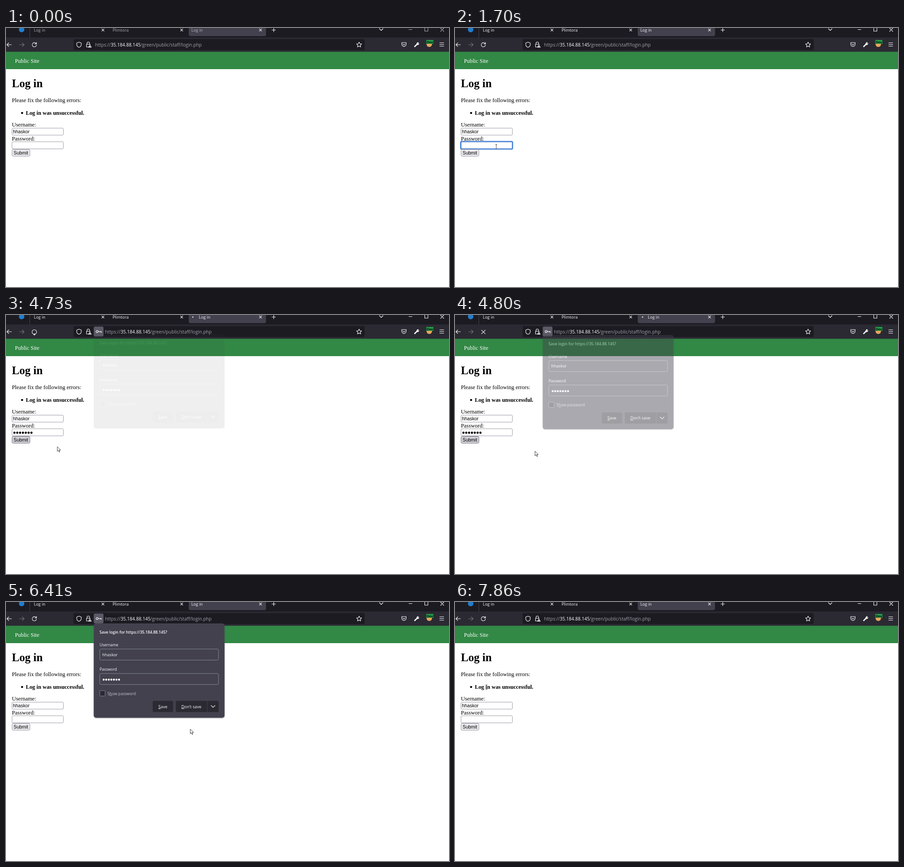
Write an HTML page that moves like this. It is 977 px wide and 573 px high and loops after 7990 ms.

```html
<!DOCTYPE html>
<html lang="en">
<head>
<meta charset="utf-8">
<title>Log in</title>
<style>
  html, body { margin: 0; width: 100%; height: 100%; overflow: hidden; background: #fff; }
  svg { display: block; }
  text { white-space: pre; }
  .ui { font: 9px "Open Sans", sans-serif; fill: #fbfbfe; }
  .url { font-size: 10.1px; fill: #a2a2ac; }
  .page { font: 12.35px "Liberation Serif", serif; }
  .form { font: 10.3px "Liberation Sans", sans-serif; }
  .icon { fill: none; stroke: #fbfbfe; stroke-width: 1.1; stroke-linecap: round; stroke-linejoin: round; }
  .field { fill: #fff; stroke: #8f8f9d; stroke-width: .9; }
  .box { fill: #42414d; stroke: #8f8f9d; stroke-width: .9; }
  .button { fill: #2b2a33; }
  .key { text-decoration: underline; }
</style>
</head>
<body>
<svg width="977" height="573" viewBox="0 0 977 573">
  <defs>
    <clipPath id="tabShape"><path d="M403 0h170.500v14a4 4 0 0 1-4 4h-162.500a4 4 0 0 1-4-4z"/></clipPath>
    <radialGradient id="glow">
      <stop offset=".35" stop-color="#0a84ff"/>
      <stop offset="1" stop-color="#0a84ff" stop-opacity="0"/>
    </radialGradient>
  </defs>

  <!-- page -->
  <rect y="52" width="977" height="39" fill="#328845"/>
  <g class="page">
    <text x="19.700" y="77" fill="#fff">Public Site</text>
    <text x="13" y="130.500" font-size="24.700" font-weight="bold">Log in</text>
    <text x="13" y="164">Please fix the following errors:</text>
    <circle cx="35.500" cy="188" r="2.300"/>
    <text x="43.700" y="191.500" font-weight="bold">Log in was unsuccessful.</text>
    <text x="13" y="218">Username:</text>
    <text x="13" y="249">Password:</text>
  </g>
  <g class="form">
    <rect class="field" x="13.300" y="221.500" width="113.200" height="15.500" rx="2"/>
    <text x="15.300" y="233.300">hhaskor</text>
    <rect id="password" class="field" x="13.300" y="251.700" width="113.200" height="15.700" rx="2"/>
    <g id="focus" fill="none">
      <rect x="11.500" y="250" width="116.500" height="19" rx="3" stroke="#a9c8f4" stroke-width="1.500"/>
      <rect x="13" y="251.500" width="113.500" height="16" rx="1.500" stroke="#0a58c8" stroke-width="1.600"/>
    </g>
    <g id="dots"></g>
    <path id="caret" d="M0 253.500v12.500" stroke="#000" stroke-width=".9"/>
    <rect id="submit" x="13.300" y="268.500" width="39.500" height="15.200" rx="3" stroke="#8f8f9d" stroke-width=".9"/>
    <text x="16.800" y="280">Submit</text>
  </g>

  <!-- tab strip -->
  <rect width="977" height="21" fill="#1c1b22"/>
  <rect y="21" width="977" height="31.500" fill="#2b2a33"/>
  <path d="M52.500 0v21" stroke="#45444f"/>
  <circle cx="34.500" cy="3.500" r="6" fill="#1f7fd0"/>
  <g clip-path="url(#tabShape)">
    <rect x="403" width="171" height="18" fill="#42414d"/>
    <circle id="burst" cx="412" cy="5" fill="url(#glow)"/>
  </g>
  <circle id="spinner" cy="4.500" r="1.500" fill="#d5d5dc"/>
  <g class="ui" id="labels">
    <text x="61.500" y="8">Log in</text>
    <text x="235" y="8">Plimtora</text>
    <text id="tabLabel" y="8">Log in</text>
    <g class="icon" stroke-width="1">
      <path d="M888.500 3.500h7M923.500-1h7v8h-7zM958.500.500l7 7m0-7l-7 7"/>
    </g>
  </g>
  <g class="icon">
    <path d="M211.300 1.800l5 5m0-5l-5 5M385 1.800l5 5m0-5l-5 5M558.800 1.800l5 5m0-5l-5 5"/>
    <path d="M586.500 4.500h8m-4-4v8M823.500 1.500l4 4 4-4"/>
  </g>

  <!-- toolbar -->
  <rect x="149" y="24.500" width="642" height="24.500" rx="3.500" fill="#1c1b22"/>
  <g class="icon">
    <path d="M12 37H2m4.200-4.200L2 37l4.200 4.200"/>
    <path d="M30 37h10m-4.200-4.200L40 37l-4.200 4.200" stroke="#777681"/>
    <g id="reload"><path d="M66.300 34.300A4.700 4.700 0 1 0 67.200 37.500M67.300 31.800v3.400h-3.500"/></g>
    <g id="ring"><circle cx="62.500" cy="37.500" r="5"/><path d="M61 43.500l2.500-2v3z" fill="#fbfbfe"/></g>
    <path id="stop" d="M58.500 33.300l8.300 8.300m0-8.300l-8.300 8.300"/>
    <path d="M161 31.200l5 2v3.300c0 3-2 5.200-5 6.200-3-1-5-3.200-5-6.200v-3.300z"/>
    <path d="M178.700 36v-2.200a2.800 2.800 0 0 1 5.600 0V36M184 42h-6.500v-6h8v1"/>
    <path d="M185.200 37.500l3.300 5.300h-6.600z" fill="#fbfbfe" stroke-width=".6"/>
    <path d="M185.200 39.300v2.200" stroke="#1c1b22" stroke-width=".8"/>
    <path d="M778.700 31.200l1.700 3.600 3.900.5-2.900 2.700.8 3.900-3.500-1.900-3.500 1.900.8-3.900-2.900-2.700 3.900-.5z"/>
    <path d="M872.800 32.300h9.700v3.700a4.850 4.850 0 0 1-9.700 0zM875 35.300l2.600 2.400 2.600-2.400"/>
    <path d="M901.500 41l4.800-4.800" stroke-width="2.600"/>
    <path d="M909.600 32.200l-2 2 .3 1.200 1.200.3 1.500-1.700a3 3 0 0 1-4 3 3 3 0 0 1 3-4.800z" fill="#fbfbfe"/>
    <path d="M956.500 32.800h9m-9 3.700h9m-9 3.700h9"/>
  </g>
  <circle cx="933.500" cy="36" r="6" fill="#e8a55c"/>
  <rect x="927" y="26.500" width="15.500" height="8.500" fill="#22a04a"/>
  <text x="928" y="33.800" font-family="Liberation Sans, sans-serif" font-size="7.500" font-weight="bold">Dev</text>
  <g id="keyIcon">
    <rect id="keyBack" x="193.500" y="25.500" width="21.500" height="22" rx="3" fill="#5b5a66"/>
    <g class="icon"><circle cx="201" cy="36.500" r="2.300"/><path d="M203.300 36.500h7v2.300m-2.500-2.300v1.700"/></g>
  </g>
  <g id="address" class="ui">
    <text class="url" x="196.500" y="41.300">https://<tspan x="231" fill="#fbfbfe">35.184.88.145</tspan><tspan x="296.500">/green/public/staff/login.php</tspan></text>
  </g>

  <!-- save-login panel -->
  <g id="panel" class="ui">
    <rect x="192.500" y="49" width="291" height="210" rx="6" fill="#000" opacity=".08"/>
    <rect x="193.800" y="48" width="288" height="208" rx="5" fill="#42414d" stroke="#52525e" stroke-width=".8"/>
    <text x="206.300" y="70.300" font-size="8.700" font-weight="600" style="font-size:8.600px">Save login for https://35.184.88.145?</text>
    <text x="206.500" y="98" style="font-size:8.500px">Username</text>
    <rect class="box" x="206.800" y="104" width="262" height="24.500" rx="3"/>
    <text x="212.300" y="119.700">hhaskor</text>
    <text x="206.500" y="152.300" style="font-size:8.500px">Password</text>
    <rect class="box" x="206.800" y="158.200" width="262" height="24.300" rx="3"/>
    <g id="panelDots"></g>
    <rect class="box" x="206.800" y="196" width="11.700" height="12" rx="1.500" style="fill:#2b2a33"/>
    <text x="223.700" y="205.500" fill="#c3c3cc" style="font-size:8.600px">S<tspan class="key">h</tspan>ow password</text>
    <rect class="button" x="323.500" y="218.700" width="45" height="24.800" rx="3"/>
    <text x="336" y="234.500" style="font-size:9.200px"><tspan class="key">S</tspan>ave</text>
    <path id="dontSave" d="M443.500 218.700v24.800h-66a3 3 0 0 1-3-3v-18.800a3 3 0 0 1 3-3z"/>
    <text x="386.700" y="234.500" style="font-size:9.200px"><tspan class="key">D</tspan>on’t save</text>
    <path class="button" d="M444.500 218.700h21.500a3 3 0 0 1 3 3v18.800a3 3 0 0 1-3 3h-21.500z"/>
    <path class="icon" d="M452.500 229l4.200 4.200 4.200-4.200"/>
  </g>

  <g id="pointer">
    <circle id="click" r="9.300" fill="#d8c722" opacity=".82"/>
    <path id="arrow" d="M0 0v10.200l2.400-2.200 1.700 3.900 1.600-.7-1.700-3.800h3.300z" fill="#fff" stroke="#111" stroke-width=".8"/>
    <path id="beam" d="M-2-5h1.500l.5.5.5-.5H2M0-4.500v9M-2 5h1.500l.5-.5.5.5H2" fill="none" stroke="#333" stroke-width=".9"/>
  </g>
</svg>
<script>
const LOOP = 7990;
const KEYSTROKES = [2430, 2690, 2960, 3150, 3440, 3640, 3840];
// pointer stops: time, x, y
const STOPS = [
  [150, 705, 506], [850, 91, 262.5], [3840, 91, 262.5], [4370, 33, 278], [4560, 33, 279],
  [5130, 408, 337], [5390, 410, 326.5], [6000, 410, 326], [6810, 403, 238], [7200, 403, 234],
  [7480, 403, 234], [7740, 132, 190], [7860, 69.5, 188.5]
];

const $ = id => document.getElementById(id);
const clamp = v => Math.max(0, Math.min(1, v));
const set = (id, attrs) => { for (const k in attrs) $(id).setAttribute(k, attrs[k]); };
const show = (id, on) => { $(id).style.display = on ? '' : 'none'; };

function addDots(id, x, y, step, r, fill) {
  $(id).innerHTML = KEYSTROKES.map((_, i) =>
    `<circle cx="${x + i * step}" cy="${y}" r="${r}" fill="${fill}"/>`).join('');
}
addDots('dots', 18.6, 260.5, 6.25, 2.4, '#000');
addDots('panelDots', 215.4, 171.7, 5.65, 2.2, '#fbfbfe');

function pointerAt(t) {
  const next = STOPS.findIndex(s => s[0] > t);
  if (next < 1) return STOPS[next ? STOPS.length - 1 : 0].slice(1);
  const [t0, x0, y0] = STOPS[next - 1], [t1, x1, y1] = STOPS[next];
  const u = (t - t0) / (t1 - t0), e = u * u * (3 - 2 * u);
  return [x0 + (x1 - x0) * e, y0 + (y1 - y0) * e];
}

function render(t) {
  const within = (a, b) => t >= a && t < b;
  const [x, y] = pointerAt(t);
  const inside = (l, top, r, b) => x > l && x < r && y > top && y < b;

  // pointer
  const overField = inside(13, 251, 127, 268);
  const beam = overField || inside(13, 180, 175, 197);
  show('pointer', t >= 180);
  set('pointer', { transform: `translate(${x} ${y})` });
  show('beam', beam);
  show('arrow', !beam);
  show('click', within(1110, 1440) || within(4370, 4580) || within(7270, 7480));

  // form
  const typed = KEYSTROKES.filter(k => k <= t).length;
  const focused = within(1250, 4580);
  set('labels', { opacity: t < 1250 ? .65 : 1 });
  $('password').style.stroke = overField ? '#676774' : '';
  show('focus', focused);
  [...$('dots').children].forEach((dot, i) => { dot.style.display = i < typed && t < 5390 ? '' : 'none'; });
  show('caret', focused && !within(1700, 2230) && !within(3290, 3440));
  set('caret', { transform: `translate(${16.3 + typed * 6.2} 0)` });
  const pressed = t < 5390 && (inside(13, 268, 53, 284) || within(4370, 5390));
  set('submit', { fill: pressed ? '#d0d0d7' : '#e9e9ed', stroke: pressed ? '#676774' : '#8f8f9d' });

  // tab and reload button
  const burst = clamp((t - 5390) / 490);
  show('burst', within(5390, 5880));
  set('burst', { r: 8 + 170 * burst, opacity: .6 * (1 - burst) });
  show('spinner', within(4660, 5390));
  set('spinner', { cx: 412 + 4 * Math.sin((t - 4730) / 160) });
  set('tabLabel', { x: within(4660, 5850) ? 425.3 : 408.7 });
  show('reload', !within(4660, 6070));
  show('ring', within(4660, 4800));
  show('stop', within(4800, 6070));
  $('stop').style.stroke = t < 5390 ? '' : '#8f8f9d';

  // address bar and panel
  const hasKey = within(2430, 7500);
  show('keyIcon', hasKey);
  show('keyBack', t >= 4660);
  set('address', { transform: `translate(${hasKey ? 21.7 : 0} 0)` });
  const opening = clamp((t - 4715) / 190);
  show('panel', within(4715, 7560));
  set('panel', {
    opacity: opening * (1 - clamp((t - 7480) / 80)),
    transform: `translate(0 ${-6 * (1 - opening)})`
  });
  set('dontSave', { fill: inside(375, 218, 444, 244) ? '#5f5e69' : '#2b2a33' });
}

let start;
function tick(now) {
  start ??= now;
  render((now - start) % LOOP);
  requestAnimationFrame(tick);
}
render(0);
requestAnimationFrame(tick);
</script>
</body>
</html>
```
